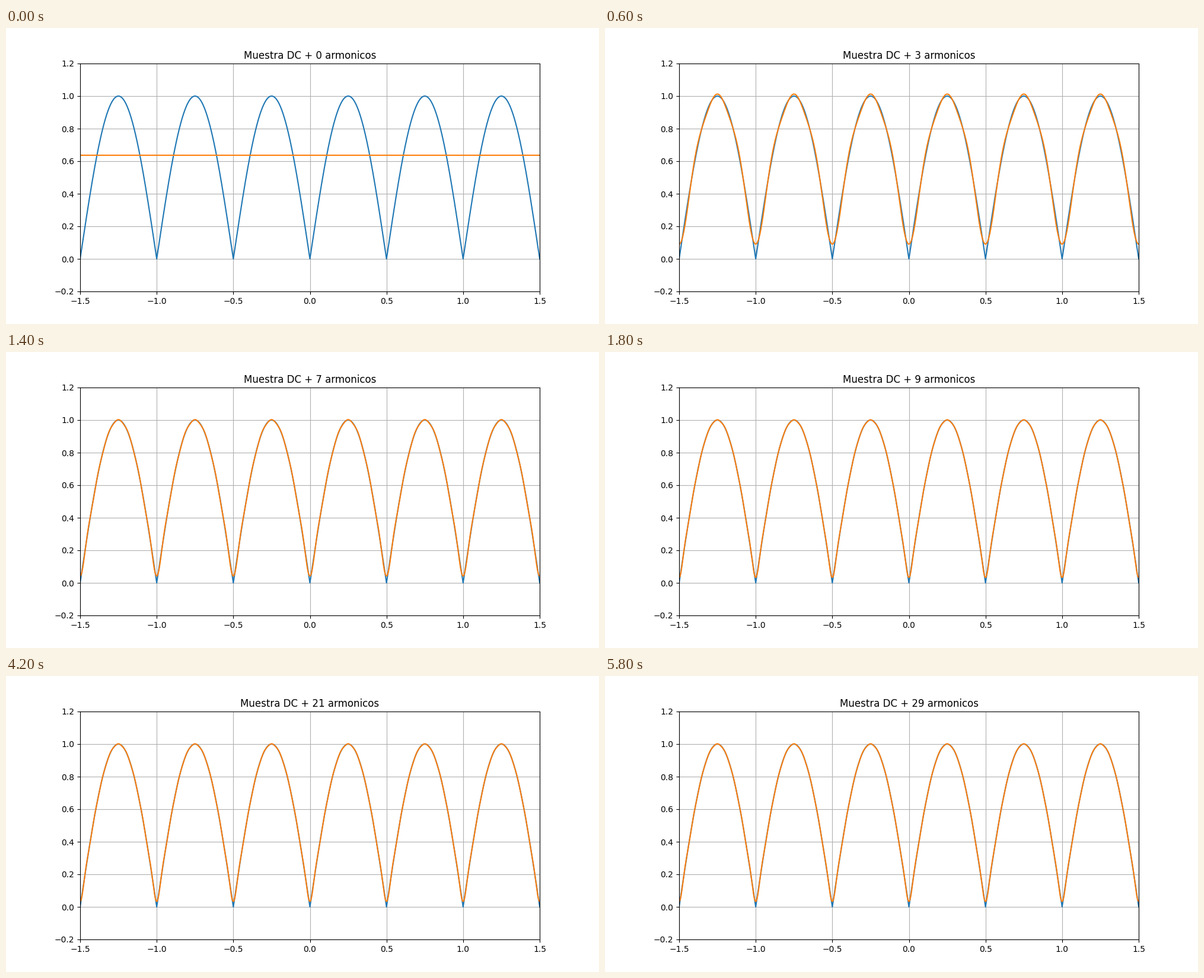
Write a matplotlib script that moves like this. It is 1000x500 px and loops after 6 s.

```python
import numpy as np
import matplotlib.pyplot as plt
from matplotlib.animation import FuncAnimation

FRAMES = 30
INTERVAL = 200
MAX_TERMS = 9  # the series stops growing here, the title keeps counting

t = np.linspace(-1.5, 1.5, 3001)


def series(count):
    """Fourier sum of |sin(2 pi t)|: mean value plus `count` harmonics."""
    y = np.full_like(t, 2 / np.pi)
    for n in range(1, count + 1):
        y -= 4 / np.pi * np.cos(4 * np.pi * n * t) / (4 * n * n - 1)
    return y


fig, ax = plt.subplots(figsize=(10, 5), dpi=100)
ax.plot(t, np.abs(np.sin(2 * np.pi * t)), color="tab:blue")
line, = ax.plot(t, series(0), color="tab:orange")
ax.set_xlim(-1.5, 1.5)
ax.set_ylim(-0.2, 1.2)
ax.grid(True)
title = ax.set_title("")


def update(frame):
    line.set_ydata(series(min(frame, MAX_TERMS)))
    title.set_text(f"Muestra DC + {frame} armonicos")
    return line, title


anim = FuncAnimation(fig, update, frames=FRAMES, interval=INTERVAL,
                     init_func=lambda: update(0), repeat=True, repeat_delay=0)
plt.show()
```
